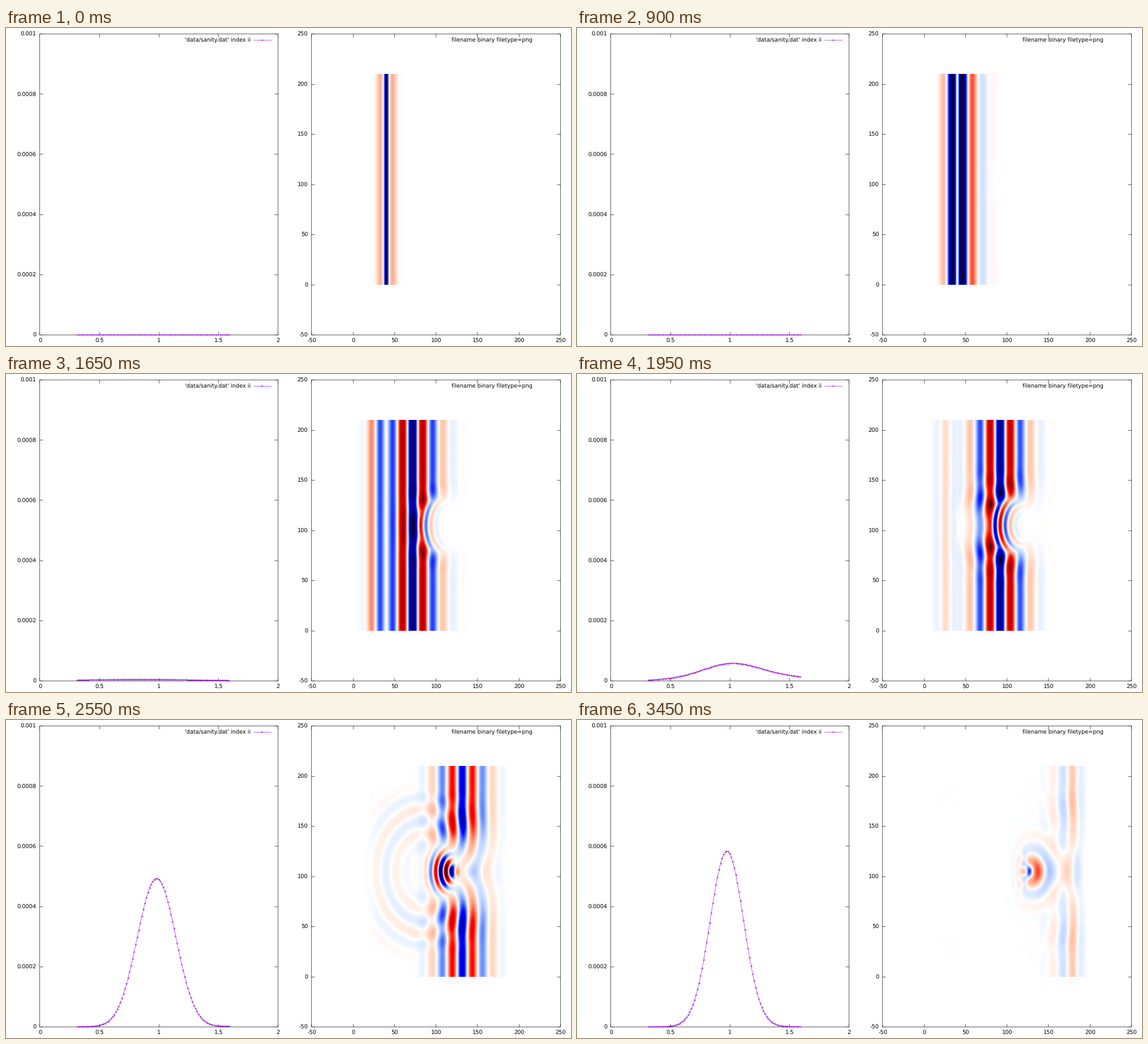
A matplotlib script that plays this animation: 998x561 px, repeating every 3.6 s.

```python
import numpy as np
import matplotlib.pyplot as plt
from matplotlib.animation import FuncAnimation
from matplotlib.colors import LinearSegmentedColormap

W, H, DPI = 998, 561, 64
PX = 72 / DPI                      # points per pixel
FRAMES, INTERVAL = 24, 150
VIOLET = "#9400d3"
plt.rcParams.update({"font.family": "DejaVu Sans", "font.size": 9.7 * PX,
                     "text.hinting": "none"})

# Pulse and geometry: lengths in radii of the sphere, c = 1
CELLS, RES = 210, 25
MID = CELLS // 2
COURANT = 1 / 3
DT = COURANT / RES
OMEGA, WIDTH = 6.0, np.pi / 4
PEAK = 5 * WIDTH
PML = np.pi / 2 * RES              # absorber depth in cells
INNER = (1 + np.pi / 2) * RES      # centre to absorber, in cells
SIGMA = 16.5
T0, T_STEP = 0.8, 0.4


def current(t):
    """Time derivative of a Gaussian dipole pulse."""
    s = t - PEAK
    envelope = np.exp(-s**2 / (2 * WIDTH**2))
    return envelope * (np.cos(OMEGA * s)
                       - s / (WIDTH**2 * OMEGA) * np.sin(OMEGA * s))


def absorber(dist):
    """Decay and gain per step at a distance from the centre."""
    depth = np.maximum(np.abs(dist) - INNER, 0) / PML
    loss = SIGMA * depth**2 * DT / 2
    return (1 - loss) / (1 + loss), COURANT / (1 + loss)


def ahead(f, axis):
    return np.roll(f, -1, axis) - f


def behind(f, axis):
    return f - np.roll(f, 1, axis)


def out_diff(f):
    """Radial step from half to whole radii, zero past the rim."""
    return np.diff(f, axis=0, append=0)


def in_diff(f):
    """Radial step from whole to half radii, zero on the axis."""
    return np.diff(f, axis=0, prepend=0)


def simulate():
    """Plane pulse hitting a dielectric sphere (n = 2).

    The pulse is a 1D run; the scattered wave is a rotationally symmetric
    FDTD run around the axis of travel with azimuthal order 1.
    """
    x = np.arange(CELLS) + 0.5 - MID
    half = np.arange(MID)[:, None] + 0.5
    whole = half + 0.5

    def contrast(r, pos):
        return 3 * np.clip(RES + 0.5 - np.hypot(r, pos), 0, 1)

    kx, gx = absorber(x)
    kxs, gxs = absorber(x + 0.5)
    kr, gr = absorber(half)
    krs, grs = absorber(whole)
    c_r, c_p = contrast(whole, x), contrast(half, x)
    eps_r, eps_p, eps_a = 1 + c_r, 1 + c_p, 1 + contrast(half, x + 0.5)
    sheet = np.clip(1 - np.abs(x + INNER), 0, 1) * DT * RES

    e_in, h_in = np.zeros(CELLS), np.zeros(CELLS)
    er1, er2, ep1, ep2, ea, hr1, hr2, hp1, hp2, ha = np.zeros(
        (10, MID, CELLS))
    first, every = round(T0 / DT), round(T_STEP / DT)
    shots = []
    for n in range(1, first + every * (FRAMES - 1) + 1):
        h_in = kxs * h_in + gxs * ahead(e_in, 0)
        old = e_in
        e_in = kx * e_in + gx * behind(h_in, 0)
        e_in = e_in - sheet * current((n - 0.5) * DT)
        change = e_in - old

        er, ep = er1 + er2, ep1 + ep2
        hr1 = hr1 + COURANT * ea / half
        hr2 = kxs * hr2 + gxs * ahead(ep, 1)
        hp1 = kxs * hp1 - gxs * ahead(er, 1)
        hp2 = krs * hp2 + grs * out_diff(ea)
        ha = krs * ha - grs * (out_diff(half * ep) + er) / whole

        hr, hp = hr1 + hr2, hp1 + hp2
        er1 = er1 + (COURANT * ha / whole - c_r * change) / eps_r
        er2 = kx * er2 - gx * behind(hp, 1) / eps_r
        ep1 = kx * ep1 + gx * behind(hr, 1) / eps_p + c_p * change / eps_p
        ep2 = kr * ep2 - gr * in_diff(ha) / eps_p
        ea = kr * ea + gr * (in_diff(whole * hp) - hr) / half / eps_a

        if n >= first and (n - first) % every == 0:
            side = e_in - ep1 - ep2
            shots.append(np.vstack([side[::-1], side]))
    # colour range follows the largest value seen so far
    top = np.maximum.accumulate([np.abs(s).max() for s in shots])
    return [s / m for s, m in zip(shots, top)]


FREQ = np.linspace(1, 5, 100) / np.pi


def flux(t):
    """Power spectrum gathered up to time t at the middle plane."""
    center, spread = 0.976, 0.804
    w0 = 2 * np.pi * center
    end = 0.92 * (t - 6.43)
    phase = w0 * (t - 6.527 - end)
    s = np.linspace(-4, end, 500)
    wave = np.exp(-s**2 / (2 * spread**2)) * np.cos(w0 * s + phase)
    total = np.exp(2j * np.pi * np.outer(FREQ, s)) @ wave * (s[1] - s[0])
    return 5.83e-4 * np.abs(total)**2 / (spread**2 * np.pi / 2)


def color_map():
    warm = [(0, (255, 255, 255)), (0.03, (255, 243, 236)),
            (0.13, (255, 208, 184)), (0.25, (255, 160, 130)),
            (0.37, (255, 88, 58)), (0.5, (255, 0, 0)),
            (0.75, (160, 0, 14)), (1, (18, 0, 22))]
    cool = [(0, (255, 255, 255)), (0.03, (236, 244, 255)),
            (0.13, (196, 216, 255)), (0.25, (125, 158, 255)),
            (0.37, (55, 84, 255)), (0.5, (0, 0, 255)),
            (0.75, (0, 0, 165)), (1, (14, 0, 30))]
    stops = [((1 - v) / 2, c) for v, c in cool[::-1]]
    stops += [((1 + v) / 2, c) for v, c in warm[1:]]
    return LinearSegmentedColormap.from_list(
        "field", [(p, tuple(k / 255 for k in c)) for p, c in stops], N=511)


fig = plt.figure(figsize=(W / DPI, H / DPI), dpi=DPI, facecolor="white")
ax = fig.add_axes([0, 0, 1, 1])
ax.axis("off")

TOP, BOTTOM, TICK = 10.0, 541.0, 5.5
LEFT = (59.5, 480.0, 0, 2, 0, 0.001)
RIGHT = (539.5, 979.0, -50, 250, -50, 250)


def to_x(panel, v):
    x0, x1, lo, hi = panel[:4]
    return x0 + (x1 - x0) * (v - lo) / (hi - lo)


def to_y(panel, v):
    lo, hi = panel[4:]
    return BOTTOM - (BOTTOM - TOP) * (v - lo) / (hi - lo)


def line(xs, ys):
    ax.plot(xs, ys, color="black", lw=0.65 * PX, solid_capstyle="butt",
            snap=True, zorder=3)


def label(x, y, text, ha):
    ax.text(x, y + 3.6, text, ha=ha, va="baseline", zorder=4)


def draw_panel(panel, xticks, yticks):
    x0, x1 = panel[:2]
    line([x0, x1, x1, x0, x0], [TOP, TOP, BOTTOM, BOTTOM, TOP])
    for v in xticks:
        x = to_x(panel, v)
        line([x, x], [BOTTOM, BOTTOM - TICK])
        line([x, x], [TOP, TOP + TICK])
        label(x + 0.5, 550, f"{v:g}", "center")
    for v in yticks:
        y = to_y(panel, v)
        line([x0, x0 + TICK], [y, y])
        line([x1, x1 - TICK], [y, y])
        label(x0 - 6.3, y - 0.3, f"{v:g}", "right")


def points(xs, ys, **kw):
    return ax.plot(xs, ys, color=VIOLET, lw=0.6 * PX, marker="+",
                   markersize=4.6 * PX, markeredgewidth=0.6 * PX,
                   zorder=5, **kw)[0]


draw_panel(LEFT, np.arange(5) / 2, np.arange(6) / 5000)
draw_panel(RIGHT, range(-50, 251, 50), range(-50, 251, 50))
label(432, 20, "'data/sanity.dat' index ii", "right")
label(930, 20, "filename binary filetype=png", "right")
points([437, 452.5, 468], [20.5] * 3, markevery=[1])

fields = simulate()
edges = (-0.5, CELLS - 0.5)
image = ax.imshow(fields[0], cmap=color_map(), vmin=-1, vmax=1, origin="lower",
                  interpolation="bilinear", aspect="auto", zorder=1,
                  extent=[to_x(RIGHT, v) for v in edges]
                  + [to_y(RIGHT, v) for v in edges])
curve = points(to_x(LEFT, FREQ), np.full(FREQ.size, BOTTOM))
ax.set_xlim(0, W)
ax.set_ylim(H, 0)


def update(k):
    image.set_data(fields[k])
    curve.set_ydata(to_y(LEFT, flux(T0 + T_STEP * k)))
    return image, curve


anim = FuncAnimation(fig, update, frames=FRAMES, interval=INTERVAL,
                     repeat=True, repeat_delay=0)
plt.show()
```
